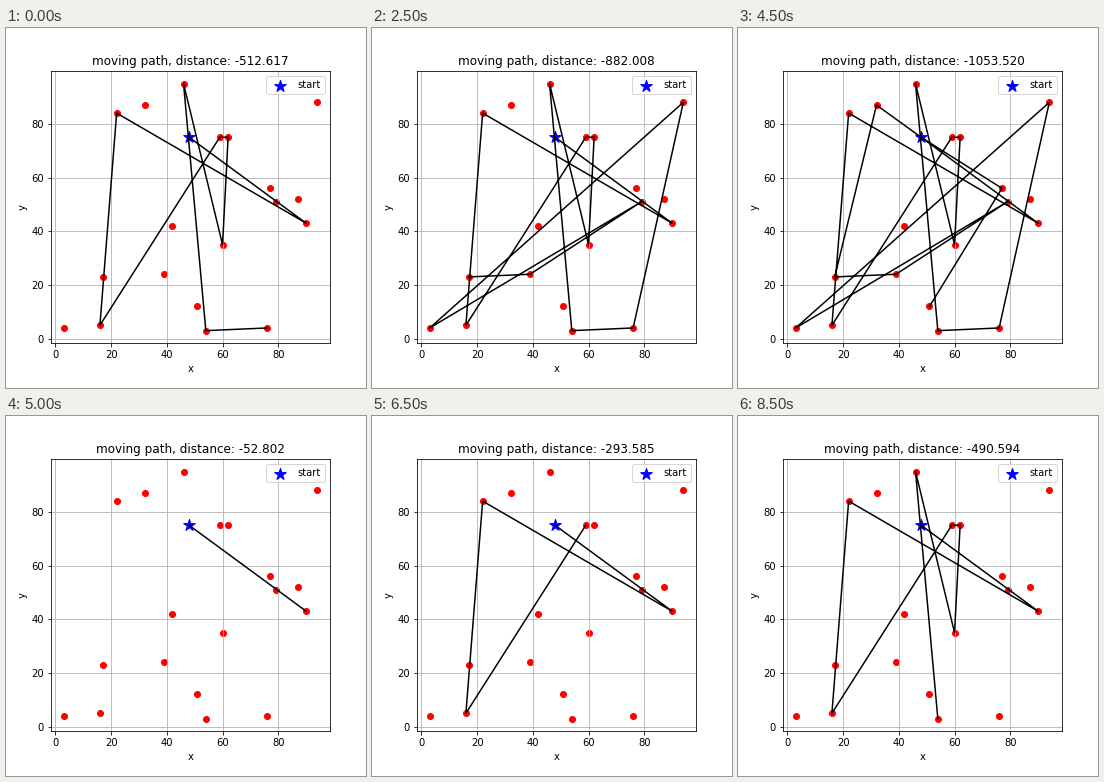
These frames come from a looping animation (360 by 360 pixels, 9000 ms). A matplotlib script:

```python
import numpy as np
import matplotlib.pyplot as plt
from matplotlib.animation import FuncAnimation

START = (48, 75)
ROUTE = np.array([
    START, (90, 43), (22, 84), (16, 5), (59, 75), (62, 75), (60, 35),
    (46, 95), (54, 3), (76, 4), (94, 88), (3, 4), (79, 51), (39, 24),
    (17, 23), (32, 87), START, (77, 56), (51, 12),
])
UNVISITED = [(42, 42), (87, 52)]
STEPS = len(ROUTE) - 1
FIRST_STEP = 9

lengths = np.hypot(*np.diff(ROUTE, axis=0).T)
travelled = np.concatenate([[0], np.cumsum(lengths)])
cities = np.array([p for p in ROUTE.tolist() if tuple(p) != START] + UNVISITED)


def padded(values, margin=0.05):
    pad = margin * np.ptp(values)
    return values.min() - pad, values.max() + pad


fig, ax = plt.subplots(figsize=(5, 5), dpi=72, facecolor="white")
fig.subplots_adjust(left=0.125, right=0.9, bottom=0.125, top=0.88)
ax.scatter(*cities.T, color="red")
ax.scatter(*START, marker="*", s=150, color="blue", label="start")
path, = ax.plot([], [], "k-")
ax.set(xlabel="x", ylabel="y", xlim=padded(cities[:, 0]), ylim=padded(cities[:, 1]))
ax.set_xticks(range(0, 100, 20))
ax.set_yticks(range(0, 100, 20))
ax.grid(True)
ax.legend(loc="upper right")
title = ax.set_title("")


def draw(frame):
    step = (frame + FIRST_STEP - 1) % STEPS + 1
    path.set_data(*ROUTE[:step + 1].T)
    title.set_text(f"moving path, distance: {-travelled[step]:.3f}")
    return path, title


anim = FuncAnimation(fig, draw, frames=STEPS, init_func=lambda: draw(0),
                     interval=500, repeat=True, repeat_delay=0)
plt.show()
```
